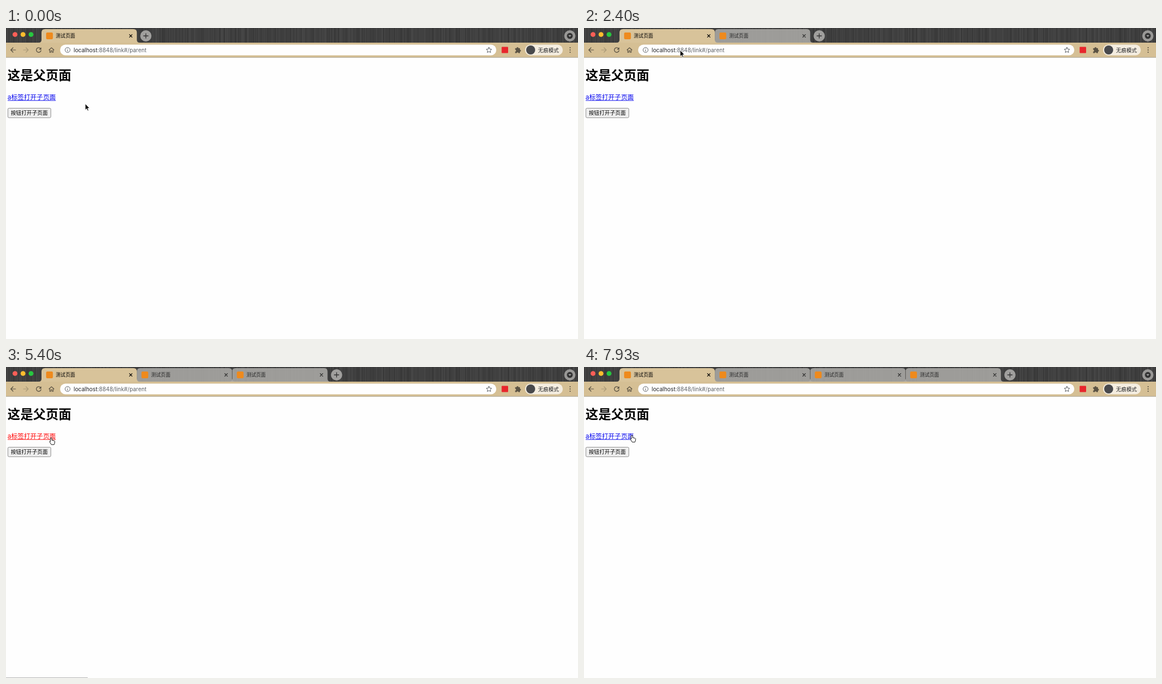
Animation of 1015 by 552 pixels, one loop 8000 ms. Source, as an HTML page:

```html
<!DOCTYPE html>
<html lang="zh-CN">
<head>
<meta charset="utf-8">
<title>测试页面</title>
<style>
  html, body { margin: 0; width: 100%; height: 100%; overflow: hidden; background: #fefefe; }
  svg { display: block; }
  text { font-family: Inter, "Noto Sans CJK SC", "Noto Sans CJK", sans-serif; white-space: pre; }
  .line { fill: none; stroke-linecap: round; stroke-linejoin: round; }
</style>
</head>
<body>
<svg id="stage" width="100%" height="100%" viewBox="0 0 1015 552">
  <g id="strip"></g>
  <g id="scene"></g>
</svg>
<script>
const LOOP = 8000, TAB_X = 63, TAB_W = 169.2;
const INK = '#5b5344', FADED = '#aa9a78', MEDIUM = 'font-weight="500"';

// Each visit: link pressed, child tab opens, first tab selected again.
const visits = [
  { press: 900, open: 1150, back: 2250 },
  { press: 3450, open: 3550, back: 4500 },
  { press: 5400, open: 5500, back: 7480 },
];

// Pointer hot spot: time, x, y
const pointerPath = [
  [0, 141, 135], [150, 135, 146], [300, 112, 147], [450, 92, 137], [600, 82, 124.5],
  [1350, 82, 124.5], [1500, 105, 98], [1800, 181, 20], [1950, 182, 20],
  [2250, 182, 20], [2550, 160, 60], [3000, 90, 118], [3150, 79, 126], [3300, 77, 125],
  [3750, 77, 125], [3900, 92, 105], [4200, 165, 25], [4350, 171, 16],
  [4500, 171, 16], [5100, 95, 115], [5250, 80, 125],
  [5550, 80, 125], [5700, 170, 110], [5850, 264, 87],
  [6300, 264, 87], [6450, 245, 62], [6750, 200, 8], [7040, 182, 12],
  [7480, 182, 12], [7790, 105, 98], [7930, 85, 120.5],
];

const rect = (x, y, w, h, fill, extra = '') =>
  `<rect x="${x}" y="${y}" width="${w}" height="${h}" fill="${fill}" ${extra}/>`;
const circle = (x, y, r, fill, extra = '') =>
  `<circle cx="${x}" cy="${y}" r="${r}" fill="${fill}" ${extra}/>`;
const line = (d, color, width = 1.2) =>
  `<path class="line" d="${d}" stroke="${color}" stroke-width="${width}"/>`;
const text = (x, y, size, content, fill = '#000', extra = '') =>
  `<text x="${x}" y="${y}" font-size="${size}" fill="${fill}" ${extra}>${content}</text>`;
const cross = (x, y, r, color, width) =>
  line(`M${x - r} ${y - r}l${2 * r} ${2 * r}m0 ${-2 * r}l${-2 * r} ${2 * r}`, color, width);

function drawStrip() {
  let seed = 7, out = '';
  for (let x = 0; x < 1015; x++) {
    seed = (seed * 16807) % 2147483647;
    const g = 55 + seed % 18;
    out += rect(x, 0, 1, 26, `rgb(${g},${g},${g})`);
  }
  ['#fe5f57', '#febc2e', '#28c840'].forEach((c, i) => out += circle(16 + i * 14.2, 11.5, 4.3, c));
  out += circle(1000.5, 14, 10, '#999896') + circle(1000.5, 14, 5.2, '#333');
  return out + '<path d="M997.8 12.8h5.4l-2.7 3z" fill="#aaa"/>';
}

function tab(x, w, { active, hover, loading }) {
  const right = x + w;
  const fill = active ? '#d8c39a' : hover ? 'rgba(185,181,173,.88)' : 'rgba(172,170,167,.87)';
  const ink = active ? '#000' : '#262626';
  const shape = `<path d="M${x - 5} 26q5 0 5-5V8q0-6 6-6H${right - 6}q6 0 6 6v13q0 5 5 5z" fill="${fill}"/>`;
  const room = Math.max(0, w - 49);
  const label = loading
    ? `<linearGradient id="fade" gradientUnits="userSpaceOnUse" x1="${room - 16}" x2="${room}">
       <stop stop-color="#111"/><stop offset="1" stop-color="#111" stop-opacity="0"/></linearGradient>`
      + text(0, 17.2, 8.4, 'localhost:8848/link#/child?id=9012', 'url(#fade)')
    : text(0, 17.3, 8.55, '测试页面', ink, MEDIUM);
  const icon = loading ? line(`M${x + 15.8} 10.3l1.2.9`, '#555', 1) : rect(x + 8.2, 8, 12, 12, '#ee8a1d', 'rx="2"');
  return shape + (w > 30 ? icon : '')
    + `<svg x="${x + 25.3}" y="0" width="${room}" height="26">${label}</svg>`
    + (w > 50 ? cross(right - 10.8, 14, 2.3, ink, 1.2) : '');
}

function drawTabs(count, progress, child, loading, hover) {
  const tabs = [];
  let x = TAB_X;
  for (let i = 0; i < count; i++) {
    const fresh = child && i === 1;
    const w = TAB_W * (fresh ? progress : 1);
    tabs.push({ x, w, active: i === (child ? 1 : 0), hover: hover && i === 0, loading: fresh && loading });
    x += w;
  }
  tabs.sort((a, b) => a.active - b.active);
  let out = tabs.map(t => tab(t.x, t.w, t)).join('');
  for (let i = child ? 3 : 2; i < count; i++) {
    out += line(`M${x - TAB_W * (count - i)} 7V21`, '#55524f', 0.8);
  }
  const plus = x + 16;
  return out + circle(plus, 14, 10, '#a09f9d') + line(`M${plus - 4} 14h8m-4-4v8`, '#333', 1.3);
}

function drawToolbar(child, loading) {
  const back = child ? FADED : INK;
  const path = child ? 'child?id=9012' : 'parent';
  let out = rect(0, 26, 1015, 26, '#d5bf94') + rect(0, 51.7, 1015, 1, '#a8a193');
  out += line('M17 39H8.5m4-4l-4 4 4 4', back) + line('M31 39h8.5m-4-4l4 4-4 4', FADED);
  out += loading
    ? cross(58, 39, 3.7, INK, 1.3)
    : line('M61.2 36.2a4.2 4.2 0 1 0 .9 4', INK, 1.3) + `<path d="M62.6 34.3v4.3h-4.3z" fill="${INK}"/>`;
  out += line('M76.2 39l4.5-4 4.5 4m-7.6-.8v5h2v-3h2.2v3h2v-5', INK, 1.1);
  out += rect(96, 29.5, 774, 19, '#fefefe', 'rx="9.5"');
  out += circle(109.3, 39, 4.4, 'none', 'stroke="#5f6368"') + line('M109.3 38.8v2.5m0-4.6v.1', '#5f6368', 1);
  out += text(120, 42.6, 9.88, `<tspan fill="#202124">localhost</tspan>:8848/link#/${path}`, '#5f6368');
  out += line('M857 34.3l1.4 3.1 3.4.4-2.5 2.3.7 3.4-3-1.7-3 1.7.7-3.4-2.5-2.3 3.4-.4z', '#5f6368', 1);
  out += rect(879.5, 33.5, 11.5, 11, '#e8262c', 'rx="1"');
  out += `<path d="M903.5 35.8h2.5a1.7 1.7 0 0 1 3.4 0h2.6v2.8a1.7 1.7 0 0 1 0 3.4v2.5h-2.7a1.6 1.6 0 0 0-3.1 0h-2.7v-2.7a1.6 1.6 0 0 0 0-3.2z" fill="${INK}"/>`;
  out += rect(921, 29.5, 67, 19, '#f4ede0', 'rx="9.5"') + circle(931, 39, 8, '#48494c');
  out += text(944, 42.5, 9.25, '无痕模式', '#202124', MEDIUM);
  return out + [35, 39, 43].map(y => circle(1001, y, 1.1, INK)).join('');
}

function button(y, w, label) {
  return rect(3.3, y + 0.4, w, 16.8, '#efefef', 'stroke="#767676" stroke-width=".8" rx="2"')
    + text(8.4, y + 12.2, 9.4, label, '#000', MEDIUM);
}

function drawPage(child, pressed) {
  const shift = child ? 27 : 0;
  const color = pressed ? '#f00' : '#0000ee';
  let out = text(2.8, 91.5, 22.6, child ? '这是子页面' : '这是父页面', '#000', 'font-weight="700"');
  if (child) out += text(2.8, 127.2, 11.3, '子页面ID: 9012');
  out += text(2.8, 127.2 + shift, 11.3, 'a标签打开子页面', color) + rect(3, 128.3 + shift, 85.3, 0.9, color);
  out += button(142 + shift, 76.3, '按钮打开子页面');
  if (child) out += button(198, 57.3, '开始Debug');
  if (pressed) out += rect(0, 551, 145, 1, '#b4b4b4');
  return out;
}

function pointerAt(time) {
  const i = pointerPath.findIndex(p => p[0] > time);
  if (i < 0) return pointerPath.at(-1).slice(1);
  const [t0, x0, y0] = pointerPath[i - 1], [t1, x1, y1] = pointerPath[i];
  const k = (time - t0) / (t1 - t0);
  return [x0 + (x1 - x0) * k, y0 + (y1 - y0) * k];
}

function drawPointer(x, y, hand) {
  return hand
    ? `<path transform="translate(${x - 3.2} ${y})" d="M3.2.6c.9 0 1.4.6 1.4 1.4v3l4 .9c1 .3 1.4.9 1.2 2l-.5 3-.8 1.9H3.7L.8 8.3C.2 7.3 1.2 6.3 2.2 7.1l-.2.3V2C2 1.1 2.6.6 3.2.6z" fill="#fff" stroke="#000" stroke-width=".9"/>`
    : `<path transform="translate(${x - 0.3} ${y - 0.5})" d="M0 0v11l2.5-2.3 1.6 3.8 1.8-.8-1.6-3.6h3.4z" fill="#000" stroke="#fff" stroke-width=".8"/>`;
}

function draw(time) {
  const opened = visits.filter(v => time >= v.open);
  const last = opened.at(-1);
  const child = !!last && time < last.back;
  const age = last ? time - last.open : Infinity;
  const progress = 1 - (1 - Math.min(1, age / 260)) ** 3;
  const loading = child && age < 300;
  const pressed = visits.some(v => time >= v.press && time < v.open);
  const [x, y] = pointerAt(time);
  const hand = !child && x < 89 && y > 117 && y < 130;
  const hover = child && y < 26 && x > TAB_X && x < TAB_X + TAB_W;
  return drawTabs(1 + opened.length, progress, child, loading, hover)
    + drawToolbar(child, loading) + drawPage(child, pressed) + drawPointer(x, y, hand);
}

// The picture advances in steps of about 150 ms.
function stepTime(time) {
  return time < 7040 ? Math.floor(time / 150) * 150 : 7040 + Math.floor((time - 7040) / 148.3) * 148.3;
}

const scene = document.getElementById('scene');
document.getElementById('strip').innerHTML = drawStrip();
let shown = -1;
const start = performance.now();
function tick() {
  const time = stepTime((performance.now() - start) % LOOP);
  if (time !== shown) scene.innerHTML = draw(shown = time);
  requestAnimationFrame(tick);
}
tick();
</script>
</body>
</html>
```
